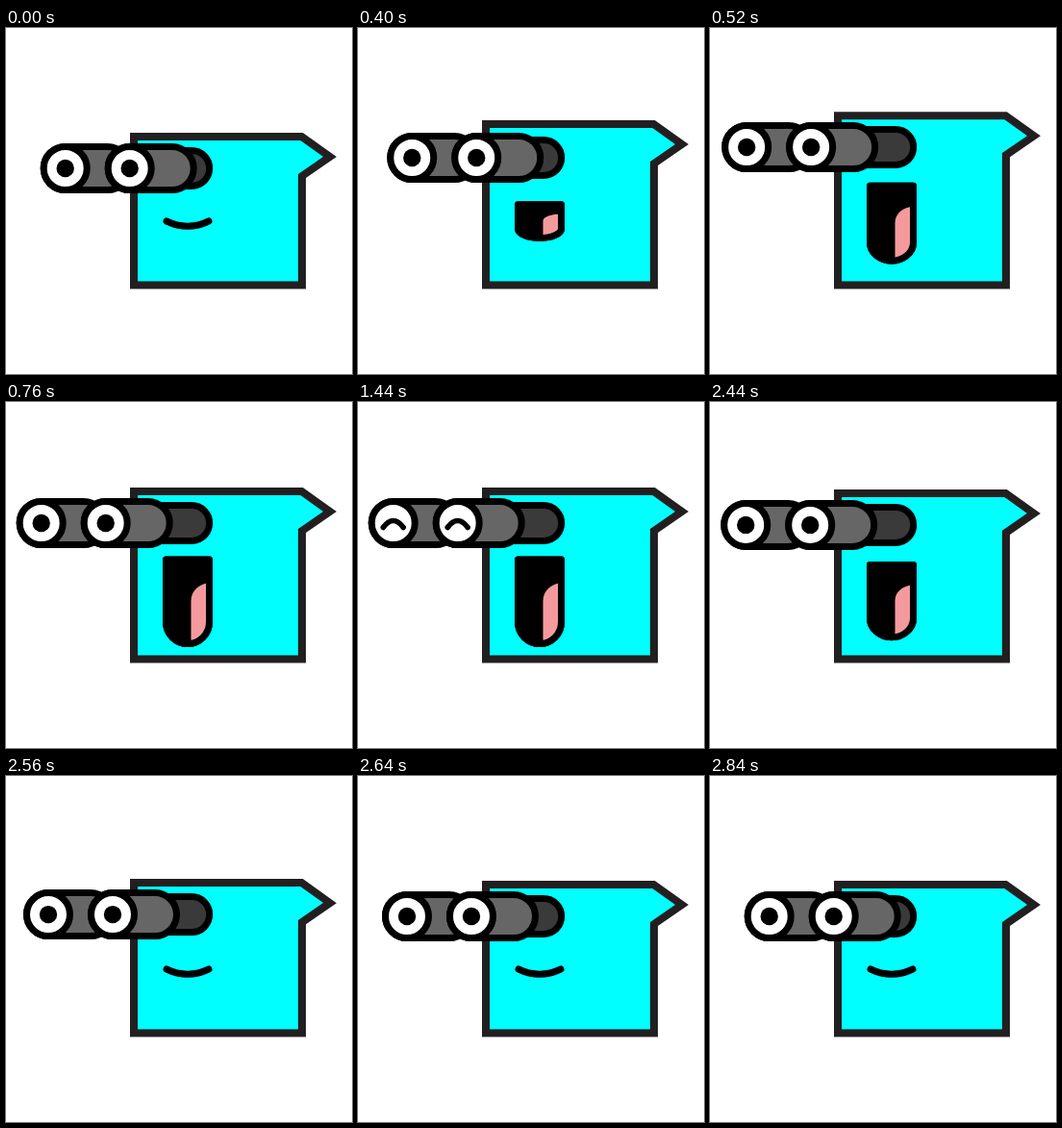
An HTML page that plays this animation: 360x360 px, repeating every 3280 ms.

```html
<!DOCTYPE html>
<html lang="en">
<head>
<meta charset="utf-8">
<title>Peeking box</title>
<style>
  html, body { margin: 0; width: 100%; height: 100%; overflow: hidden; background: #fff; }
  svg { display: block; width: 100vw; height: 100vh; }
</style>
</head>
<body>
<svg viewBox="0 0 360 360" stroke="#000" stroke-width="7">
  <defs>
    <g id="eye">
      <rect x="-22.5" y="-22.5" width="89" height="45" rx="22.5" fill="#666"/>
      <circle r="22.5" fill="#fff"/>
      <circle class="pupil" r="9.2" fill="#000" stroke="none"/>
      <path class="lid" d="M-10.5 4.5Q0 -9.5 10.5 4.5" fill="none" stroke-width="5.5" stroke-linecap="round"/>
    </g>
    <clipPath id="mouthClip"><path id="clipShape"/></clipPath>
  </defs>
  <path id="body" fill="#0ff" stroke="#231f20" stroke-width="8"/>
  <path id="smile" d="M167 201Q189 211.5 211 201" fill="none" stroke-linecap="round"/>
  <g id="mouth" stroke-linejoin="round">
    <path id="throat"/>
    <path id="tongue" fill="#f49a9c" stroke="none" clip-path="url(#mouthClip)"/>
    <path id="lips" fill="none"/>
  </g>
  <g id="eyes">
    <rect id="stalk" y="-18.5" height="37" rx="18.5" fill="#3a3a3a"/>
    <use id="farEye" href="#eye"/>
    <use id="nearEye" href="#eye"/>
  </g>
</svg>
<script>
const LOOP = 3280, STEP = 40;
const $ = id => document.getElementById(id);
const set = (id, name, value) => $(id).setAttribute(name, value);
const show = (el, visible) => el.setAttribute('visibility', visible ? 'visible' : 'hidden');
const mix = (a, b, k) => a + (b - a) * k;

// Keys are [time, value] pairs, joined with sine ease-in-out.
const bodyKeys = [[280, 0], [495, 22], [620, 20], [2400, 20], [2600, 0]];
const liftKeys = [[280, 0], [520, 22], [640, 20], [2400, 20], [2600, 0]];
const reachKeys = [[320, 0], [600, 29], [760, 25], [2400, 25], [2840, 0]];
const upperLipKeys = [[280, 0], [530, 1], [2400, 1], [2560, 0]];
const lowerLipKeys = [[280, 0], [622, 1], [2400, 1], [2560, 0]];

function track(t, keys) {
  if (t <= keys[0][0]) return keys[0][1];
  for (let i = 1; i < keys.length; i++) {
    const [t0, a] = keys[i - 1], [t1, b] = keys[i];
    if (t < t1) return mix(a, b, (1 - Math.cos(Math.PI * (t - t0) / (t1 - t0))) / 2);
  }
  return keys[keys.length - 1][1];
}

function drawMouth(t) {
  const upper = track(t, upperLipKeys), lower = track(t, lowerLipKeys);
  const isOpen = upper > 0.01;
  show($('smile'), !isOpen);
  show($('mouth'), isOpen);
  const top = mix(201, 164, upper);
  const side = mix(201, 229, lower);
  const bottom = mix(206, 251.5, lower);
  const shape = `M166.5 ${top}H211.5V${side}A22.5 ${bottom - side} 0 0 1 166.5 ${side}Z`;
  for (const id of ['throat', 'lips', 'clipShape']) set(id, 'd', shape);
  const height = bottom - top;
  const tip = top + 0.28 * height, bend = 0.21 * height;
  set('tongue', 'd', `M192.5 260V${tip + bend}A19 ${bend} 0 0 1 211.5 ${tip}V260Z`);
}

function draw(t) {
  const rise = track(t, bodyKeys);
  set('body', 'd', `M133 ${113 - rise}H307.6L337 ${134 - rise}L308 ${154 - rise}V267.5H133Z`);
  drawMouth(t);

  const reach = track(t, reachKeys), nearX = 128.7 - reach;
  set('eyes', 'transform', `translate(0 ${146 - track(t, liftKeys)})`);
  set('farEye', 'x', nearX - 67);
  set('nearEye', 'x', nearX);
  set('stalk', 'x', nearX + 20);
  set('stalk', 'width', 211.7 - nearX - 20);

  const blinking = (t >= 1440 && t < 1560) || (t >= 1880 && t < 2000);
  document.querySelectorAll('.pupil').forEach(el => show(el, !blinking));
  document.querySelectorAll('.lid').forEach(el => show(el, blinking));
}

const start = performance.now();
function tick() {
  const t = (performance.now() - start) % LOOP;
  draw(Math.floor(t / STEP) * STEP);
  requestAnimationFrame(tick);
}
tick();
</script>
</body>
</html>
```
